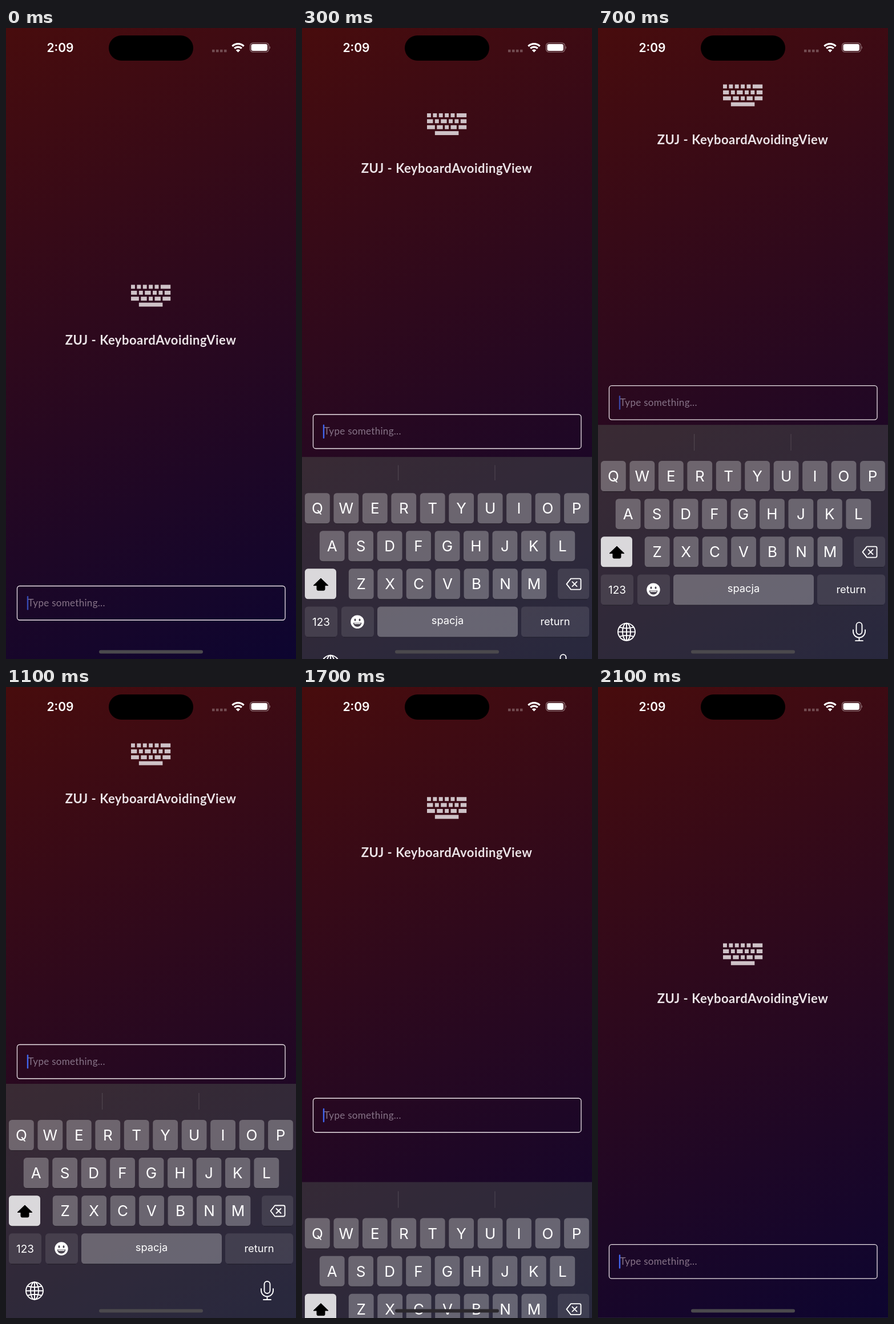
Animation of 508 by 1102 pixels, one loop 2200 ms. Source, as an HTML page:

```html
<!DOCTYPE html>
<html lang="en">
<head>
<meta charset="utf-8">
<title>Keyboard avoiding view</title>
<style>
  html, body { margin: 0; width: 100%; height: 100%; overflow: hidden; background: #000; }
  svg { display: block; width: 100%; height: 100%; }
  text { fill: #fff; text-anchor: middle; font-family: Inter, sans-serif; }
  .content text { font-family: Lato, sans-serif; }
  .line { fill: none; stroke: #fff; stroke-width: 1.9; stroke-linecap: round; stroke-linejoin: round; }
</style>
</head>
<body>
<svg viewBox="0 0 508 1102">
  <defs>
    <linearGradient id="sky" gradientUnits="userSpaceOnUse" x1="0" y1="0" x2="508" y2="1102">
      <stop offset="0" stop-color="#480c0d"/>
      <stop offset="1" stop-color="#0d0530"/>
    </linearGradient>
  </defs>
  <rect width="508" height="1102" fill="url(#sky)"/>

  <g id="content" class="content">
    <g id="icon" fill="#cec2c7"></g>
    <text x="253.5" y="553" font-size="22" font-weight="700" letter-spacing=".5" style="fill:#ebe3e7">ZUJ - KeyboardAvoidingView</text>
    <rect x="19.5" y="974.5" width="469.5" height="59.5" rx="4.5" fill="none" stroke="#ebe3e8" stroke-width="1.3"/>
    <text x="38.5" y="1010" font-size="17" letter-spacing=".3" style="text-anchor:start;fill:#867387">Type something...</text>
    <rect id="caret" x="36.8" y="992" width="2.4" height="24.5" rx="1.2" fill="#4166f0"/>
  </g>

  <g id="keyboard">
    <rect width="508" height="410" fill="rgba(84,98,84,.38)"/>
    <g id="separators" fill="#fff" fill-opacity=".13">
      <rect x="168" width="1.2"/>
      <rect x="337.4" width="1.2"/>
    </g>
    <g id="keys"></g>
    <path d="M33 212 L46 224.5 H40 V231 Q40 233 38 233 H28 Q26 233 26 231 V224.5 H20 Z" stroke="#000" stroke-linejoin="round"/>
    <path class="line" d="M471 212.5 H486 Q488.5 212.5 488.5 215 V229 Q488.5 231.5 486 231.5 H471 L463.5 222 Z M473.5 218 L481.5 226 M481.5 218 L473.5 226"/>
    <circle cx="97" cy="288" r="11.7" fill="#fff"/>
    <g fill="#49444f">
      <ellipse cx="93" cy="284.5" rx="1.5" ry="2.2"/>
      <ellipse cx="101" cy="284.5" rx="1.5" ry="2.2"/>
      <path d="M89.5 289.5 H104.5 Q103 296.5 97 296.5 T89.5 289.5"/>
    </g>
    <path d="M91.5 291 H102.5" stroke="#fff" stroke-width="1.5"/>
    <g class="line" transform="translate(50 361.5)">
      <circle r="15"/>
      <ellipse rx="7" ry="15"/>
      <path d="M0 -15 V15 M-15 0 H15 M-12 -8 Q0 -4.5 12 -8 M-12 8 Q0 4.5 12 8"/>
    </g>
    <g class="line" transform="translate(457.5 344)">
      <rect x="-5" y="1" width="10" height="21" rx="5"/>
      <path d="M-10.5 14 V17 A10.5 10.5 0 0 0 10.5 17 V14 M0 27.5 V33 M-6.5 33 H6.5"/>
    </g>
  </g>

  <rect id="home" x="163" y="1086.5" width="182" height="6" rx="3"/>

  <text x="95" y="42.3" font-size="21" font-weight="600">2:09</text>
  <rect x="180" y="13" width="148" height="44" rx="22"/>
  <path d="M361 40 H386.500" stroke="#fff" stroke-opacity=".27" stroke-width="4.5" stroke-dasharray="4.5 2.5"/>
  <g fill="none" stroke="#fff" stroke-width="3.3">
    <path d="M396.4 31.9 A14.3 14.3 0 0 1 416.6 31.9"/>
    <path d="M400.2 35.7 A8.9 8.9 0 0 1 412.8 35.7"/>
  </g>
  <path d="M406.5 42.5 L402.7 38.7 A5.4 5.4 0 0 1 410.3 38.7 Z" fill="#fff"/>
  <rect x="427.6" y="26.1" width="32.8" height="15.8" rx="5" fill="none" stroke="#fff" stroke-opacity=".42" stroke-width="1.3"/>
  <rect x="429.5" y="28" width="28.5" height="12" rx="3.3" fill="#fff"/>
  <path d="M461.8 31.5 Q464 34 461.8 36.8 Z" fill="#fff" fill-opacity=".5"/>
</svg>

<script>
const $ = id => document.getElementById(id);
const SVG_NS = 'http://www.w3.org/2000/svg';

function add(parent, tag, attributes, label) {
  const node = document.createElementNS(SVG_NS, tag);
  for (const name in attributes) node.setAttribute(name, attributes[name]);
  if (label) node.textContent = label;
  parent.append(node);
}

// Keyboard icon: key widths per row in grid units, one unit between keys.
const UNIT = 3.46;
[[2, 2, 2, 2, 2, 5], [3, 2, 3, 2, 2, 3], [4, 3, 2, 3, 4], [12]].forEach((row, r) => {
  let column = r === 3 ? 4 : 0;
  for (const width of row) {
    add($('icon'), 'rect', {
      x: 219 + column * UNIT, y: 448.5 + r * 3 * UNIT,
      width: width * UNIT, height: 2 * UNIT
    });
    column += width + 1;
  }
});

function addKey(x, row, width, label, { opacity = .28, size = 26, baseline = 36 } = {}) {
  const y = 63 + row * 66.1;
  add($('keys'), 'path', {
    d: `M${x + 4} ${y + 53.5} H${x + width - 4}`,
    stroke: '#000', 'stroke-opacity': .28, 'stroke-width': 1.2
  });
  add($('keys'), 'rect', { x, y, width, height: 53, rx: 5.5, fill: '#fff', 'fill-opacity': opacity });
  if (label) add($('keys'), 'text', { x: x + width / 2, y: y + baseline, 'font-size': size }, label);
}

[['QWERTYUIOP', 5], ['ASDFGHJKL', 30.8], ['ZXCVBNM', 81.8]].forEach(([letters, left], row) =>
  [...letters].forEach((letter, i) => addKey(left + i * 50.45, row, 43.8, letter)));
const DARK = .1;
addKey(5, 2, 55, '', { opacity: .82 });
addKey(448, 2, 55, '', { opacity: DARK });
addKey(5, 3, 57, '123', { opacity: DARK, size: 19, baseline: 33.5 });
addKey(69, 3, 57, '', { opacity: DARK });
addKey(132, 3, 246, 'spacja', { size: 18.3, baseline: 31 });
addKey(384, 3, 119, 'return', { opacity: DARK, size: 18.3, baseline: 33 });

const LOOP = 2200, KEYBOARD_HEIGHT = 409, CONTENT_SHIFT = 350;
const SHOW = { keyboard: 110, content: 113.5 };
const HIDE = { keyboard: 1622.5, content: 1645.7 };

// Critically damped spring, stiffness 1000 and mass 3.
function spring(ms) {
  const x = Math.max(0, ms) / 1000 * Math.sqrt(1000 / 3);
  return 1 - Math.exp(-x) * (1 + x);
}

const raised = (t, part) =>
  t < HIDE[part] ? spring(t - SHOW[part]) : 1 - spring(t - HIDE[part]);

const clamp = v => Math.min(1, Math.max(0, v));

// The blink restarts whenever the keyboard begins to move.
function caretOpacity(t) {
  const restart = t < SHOW.keyboard ? HIDE.keyboard - LOOP
    : t < HIDE.keyboard ? SHOW.keyboard : HIDE.keyboard;
  const phase = (t - restart) % 1000;
  return phase < 750 ? clamp((720 - phase) / 200) : clamp((phase - 800) / 180);
}

function draw(t) {
  const up = raised(t, 'keyboard');
  $('keyboard').setAttribute('transform', `translate(0 ${1102 - KEYBOARD_HEIGHT * up})`);
  $('keyboard').style.display = up > 0 ? '' : 'none';
  $('content').setAttribute('transform', `translate(0 ${-CONTENT_SHIFT * raised(t, 'content')})`);
  $('caret').style.opacity = caretOpacity(t);

  const grown = t < HIDE.keyboard ? up : 1;
  for (const bar of $('separators').children) {
    bar.setAttribute('y', 4 + 12 * grown);
    bar.setAttribute('height', 11 + 18 * grown);
  }
  const overKeys = t > 1660 && t < 1880;
  $('home').setAttribute('fill', overKeys ? '#2b282d' : '#4b494d');
}

function tick(now) {
  draw(now % LOOP);
  requestAnimationFrame(tick);
}
draw(0);
requestAnimationFrame(tick);
</script>
</body>
</html>
```
